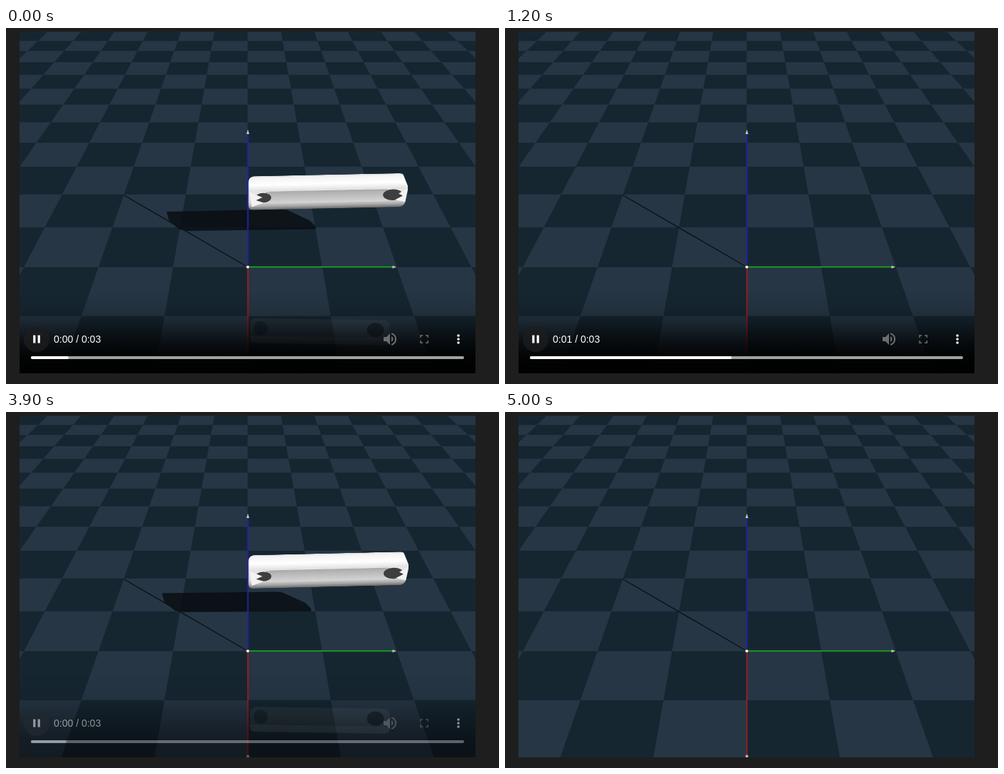
Write an HTML page that moves like this. It is 692 px wide and 500 px high and loops after 6.2 s.

```html
<!DOCTYPE html>
<html lang="en">
<head>
<meta charset="utf-8">
<title>Falling link</title>
<style>
html, body { margin: 0; width: 100%; height: 100%; overflow: hidden; background: #1e1e1e; }
svg { display: block; }
text { font: 14px "Liberation Sans", Arial, sans-serif; fill: #fff; }
</style>
</head>
<body>
<svg width="692" height="500" viewBox="0 0 692 500">
  <defs>
    <clipPath id="view"><rect x="19" y="5" width="640" height="480"/></clipPath>
    <clipPath id="above"><rect x="19" y="5" width="640" height="346"/></clipPath>
    <clipPath id="below"><rect x="19" y="337" width="640" height="148"/></clipPath>
    <linearGradient id="shade" x1="0" y1="0" x2="0" y2="1">
      <stop offset="0" stop-color="#000" stop-opacity="0"/>
      <stop offset=".28" stop-color="#000" stop-opacity=".13"/>
      <stop offset=".45" stop-color="#000" stop-opacity=".4"/>
      <stop offset=".62" stop-color="#000" stop-opacity=".7"/>
      <stop offset=".8" stop-color="#000" stop-opacity=".93"/>
      <stop offset="1" stop-color="#000"/>
    </linearGradient>
    <linearGradient id="topFace" x1="0" y1="0" x2="0" y2="1">
      <stop offset="0" stop-color="#dedede"/>
      <stop offset=".14" stop-color="#f3f3f3"/>
      <stop offset=".6" stop-color="#fff"/>
      <stop offset="1" stop-color="#e2e2e2"/>
    </linearGradient>
    <linearGradient id="front" x1="0" y1="0" x2="0" y2="1">
      <stop offset="0" stop-color="#e6e6e6"/>
      <stop offset=".6" stop-color="#dadada"/>
      <stop offset=".82" stop-color="#a8a8a8"/>
      <stop offset="1" stop-color="#686868"/>
    </linearGradient>
    <linearGradient id="groove" x1="0" y1="0" x2="0" y2="1">
      <stop id="grooveTop" offset="0"/>
      <stop offset="1" stop-color="#d4d4d4"/>
    </linearGradient>
    <clipPath id="barClip"><path id="outline"/></clipPath>
  </defs>

  <g clip-path="url(#view)">
    <rect x="19" y="5" width="640" height="480" fill="#263645"/>
    <path id="tiles" fill="#162631"/>

    <g id="body">
      <g clip-path="url(#below)"><g id="mirror">
        <path d="M0 7Q1 1 8 0H188Q195 1 196 7V29Q195 35 188 35H8Q1 35 0 29Z" fill="#a0a4a6" fill-opacity=".1"/>
        <path d="M0 25H196V29Q195 35 188 35H8Q1 35 0 29Z" fill="#c8c8c8" fill-opacity=".08"/>
        <circle cx="15" cy="14" r="10" fill="#15232d" fill-opacity=".8"/>
        <ellipse cx="176" cy="14" rx="12" ry="10" fill="#15232d" fill-opacity=".8"/>
      </g></g>
      <path id="shadow" fill="#090e12" fill-opacity=".84"/>
    </g>

    <path d="M165 234.500L339 335.500" stroke="#09131a" stroke-width="1.400"/>

    <g id="bar" clip-path="url(#above)"><g id="skewed"><g clip-path="url(#barClip)">
      <rect id="topRect" width="226" fill="url(#topFace)"/>
      <rect id="frontRect" width="226" fill="url(#front)"/>
      <path id="grooveShape" fill="url(#groove)"/>
      <path id="edge" stroke="#a2a2a2" stroke-width=".9" fill="none"/>
      <ellipse id="holeL" cx="21" rx="11.500"/>
      <ellipse id="holeR" cx="204" rx="14"/>
      <path id="petals" fill="#f2f2f2"/>
    </g></g></g>

    <path d="M339.500 336V485" stroke="#ad1a1a" stroke-width="1.700"/>
    <path d="M339.500 336V148" stroke="#2222a4" stroke-width="1.900"/>
    <path d="M339.500 335.700H545" stroke="#1ea41e" stroke-width="1.700"/>
    <path d="M339.500 142.500L341.500 149H337.500ZM548 335.700L542.500 333.700V337.700Z" fill="#c4c4c4"/>
    <circle cx="339.500" cy="483.500" r="2" fill="#b8b8b8"/>
    <rect x="337.500" y="334" width="3.600" height="3.400" fill="#f0f0f0"/>

    <g id="panel">
      <rect x="19" y="368" width="640" height="117" fill="url(#shade)"/>
      <circle cx="43" cy="437" r="18" fill="#1c1c1c" fill-opacity=".75"/>
      <g fill="#fff">
        <path id="pause" d="M38.200 431.400h3.200v11.200h-3.200zM44.600 431.400h3.200v11.200h-3.200z"/>
        <path id="play" d="M39.600 431.300v11.400l9.200-5.700z"/>
        <circle cx="635" cy="432" r="1.800"/><circle cx="635" cy="437" r="1.800"/><circle cx="635" cy="442" r="1.800"/>
      </g>
      <text id="clock" x="67" y="442"></text>
      <path transform="translate(527 425)" fill="#6c6c6c" d="M3 9v6h4l5 5V4L7 9zM16.500 12a4.500 4.500 0 0 0-2.500-4v8a4.500 4.500 0 0 0 2.500-4zM14 3.200v2.100a7 7 0 0 1 0 13.400v2.100a9 9 0 0 0 0-17.600z"/>
      <path fill="none" stroke="#606060" stroke-width="1.700" d="M581.900 435v-3.200h3.200M589 431.800h3.200v3.200M592.200 439v3.200h-3.200M585.100 442.200h-3.200v-3.200"/>
      <rect x="35" y="461" width="608" height="4" rx="2" fill="#a0a3a3"/>
      <rect id="done" x="35" y="461" height="4" rx="2" fill="#fff"/>
    </g>
  </g>
</svg>
<script>
const $ = id => document.getElementById(id);
const set = (id, attrs) => { for (const k in attrs) $(id).setAttribute(k, attrs[k]); };
const show = (id, on) => set(id, { visibility: on ? "visible" : "hidden" });
const mix = (a, b, q) => a + (b - a) * q;
const poly = pts => "M" + pts.map(p => p.map(v => v.toFixed(2)).join(" ")).join("L") + "Z";
const grey = v => `rgb(${v},${v},${v})`;

const LOOP = 6200, STEP = 100, RESTART = 3600, LENGTH = 3170;

// Floor: rows shrink towards the horizon, columns meet there.
const HORIZON = -262;
const rowY = n => HORIZON + 1 / (0.0016722 + 0.0001725 * n);
const colX = (i, y) => 339.2 + i * 0.1751 * (y - HORIZON);

function drawFloor() {
  let d = "";
  for (let n = -2; n < 13; n++) {
    const far = rowY(n + 1), near = rowY(n);
    for (let i = -8; i < 8; i++) {
      if ((n + i) % 2) continue;
      d += poly([[colX(i, far), far], [colX(i + 1, far), far],
                 [colX(i + 1, near), near], [colX(i, near), near]]);
    }
  }
  set("tiles", { d });
}

// s: seconds on the shared throw clock; the top of the arc is at 4.21.
function drawBody(s) {
  const drop = 375 * (s - 4.21) ** 2;
  const top = 161 + drop * (1 - 0.0007 * drop);
  const q = (s - 3.9) / 0.7;
  const fall = top - 196;
  const tilt = 5 + 9.5 * q;
  const a = mix(20.5, 22.5, q), b = Math.max(7, mix(26.5, 14.5, q)), h = a + b;
  const sx = (225 - fall * 0.13) / 225;

  set("skewed", { transform: `matrix(${sx} ${-tilt / 220} 0 1 340 ${top + tilt})` });
  set("outline", { d: `M0 8Q1 1 8 0H212Q218 0 219 3L225 18V${a + 4}L221 ${h - 6}Q219 ${h - 1} 212 ${h}H8Q1 ${h} 0 ${h - 6}Z` });
  set("topRect", { height: a + 0.5 });
  set("frontRect", { y: a, height: b });
  set("edge", { d: `M30 ${a + 0.08 * b}H196` });
  set("grooveShape", { d: poly([[24, a + 0.08 * b], [200, a + 0.08 * b], [191, a + 0.68 * b], [31, a + 0.68 * b]]) });

  const turn = Math.min(1, Math.max(0, q));
  set("grooveTop", { "stop-color": grey(Math.round(mix(172, 112, turn))) });
  const hole = grey(Math.round(mix(62, 142, turn)));
  set("holeL", { cy: a + 0.38 * b, ry: 0.25 * b, fill: hole });
  set("holeR", { cy: a + 0.36 * b, ry: 0.29 * b, fill: hole });
  set("petals", { d:
    poly([[2, a + 0.08 * b], [20, a + 0.36 * b], [11, a + 0.5 * b], [22, a + 0.64 * b], [5, a + 0.85 * b]]) +
    poly([[224, a + 0.05 * b], [212, a + 0.3 * b], [218, a + 0.42 * b], [207, a + 0.62 * b], [222, a + 0.75 * b]]) });

  const L = 219 + 0.85 * fall, R = L + 209;
  const yl = 281 + 0.5 * fall, yr = 280 + 0.32 * fall, t = 26.5 - 8.5 * q;
  set("shadow", { d: poly([[L, yl - t], [L + 3, yl - t * 0.55], [L + 18, yl - 2], [L + 30, yl],
    [R, yr], [R, yr - 4], [R - 8, yr - t * 0.45], [R - 40, yr - t], [R - 48, yr - t - 1]]) });

  const lean = mix(3, 9, turn);
  set("mirror", { transform: `matrix(1 ${lean / 196} 0 1 342.5 ${414 - 0.85 * fall})` });
}

function panelAlpha(t) {
  const fade = from => Math.min(1, Math.max(0, 1 - (t - from) / 600));
  if (t < 1100) return fade(50);
  if (t < 2400) return fade(1480);
  return fade(RESTART);
}

function render(now) {
  const t = Math.floor(now % LOOP / STEP) * STEP;
  const again = t >= RESTART;
  const s = (again ? t : t + 3867) / 1000;
  const visible = s < 4.95;
  show("body", visible);
  show("bar", visible);
  if (visible) drawBody(s);

  const video = Math.min(LENGTH, Math.max(0, again ? t - 3640 : t + 276));
  const ended = video === LENGTH;
  set("panel", { opacity: panelAlpha(t) });
  set("done", { width: 608 * video / LENGTH });
  show("play", ended);
  show("pause", !ended);
  $("clock").textContent = `0:0${Math.floor(video / 1000)} / 0:03`;
}

drawFloor();
const start = performance.now();
function tick() {
  render(performance.now() - start);
  requestAnimationFrame(tick);
}
tick();
</script>
</body>
</html>
```
